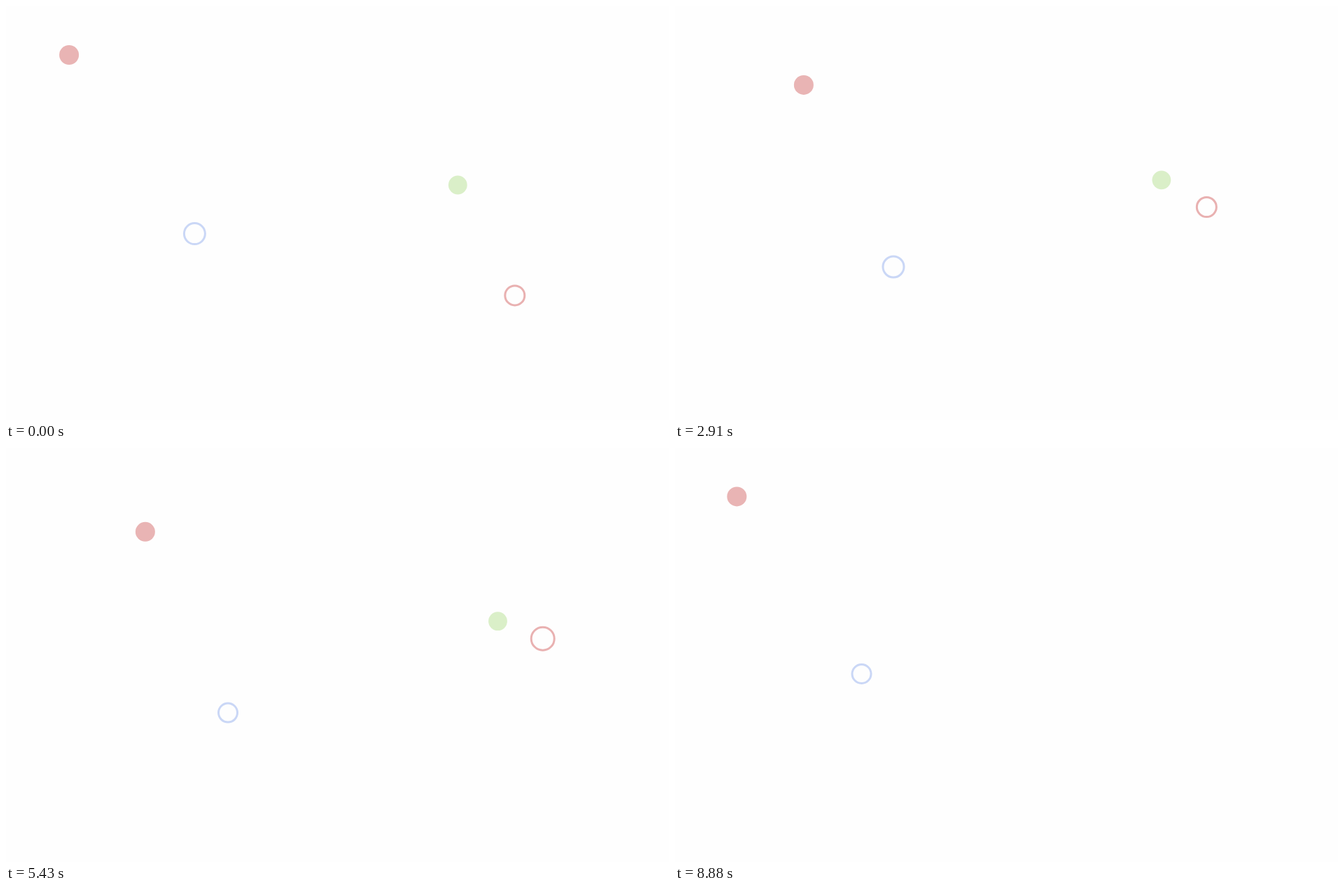
An HTML page with a canvas for the animation above (8.91 s loop, 947 by 592 pixels).

```html
<!DOCTYPE html>
<html>
<head>
<meta charset="utf-8">
<style>
html, body { margin: 0; width: 100%; height: 100%; overflow: hidden; background: #fefefe; }
canvas { display: block; }
</style>
</head>
<body>
<canvas id="stage" width="947" height="592"></canvas>
<script>
const ctx = document.getElementById('stage').getContext('2d');
const LOOP = 8910, LEG = 4400, STEP = 30;

// Each leg: start x, y, end x, y, radius.
const dots = [
  { color: '#e9b4b4', out: [90.1, 70, 231.9, 134.9, 14], back: [231.9, 134.9, 90.9, 70.6, 14] },
  { color: '#daefc8', out: [645.3, 256, 720.3, 245.2, 13.4], back: [720.1, 245.2, 644.8, 255.8, 13.4], ends: true },
  { color: '#cad7f6', ring: true, out: [269.4, 325.6, 333.8, 397.3, 15], back: [332.1, 395.2, 267.7, 324.3, 13.5] },
  { color: '#e9b1b1', ring: true, out: [726.8, 413.9, 776, 222.9, 14], back: [778.4, 227.4, 728.4, 420.6, 16.5], ends: true }
];

function drawDot(dot, t) {
  if (dot.ends && t >= 2 * LEG) return;
  const returning = t >= LEG;
  const [x0, y0, x1, y1, r] = returning ? dot.back : dot.out;
  const p = (returning ? t - LEG : t) / LEG;
  ctx.beginPath();
  ctx.arc(x0 + (x1 - x0) * p, y0 + (y1 - y0) * p, r, 0, 2 * Math.PI);
  ctx.fillStyle = ctx.strokeStyle = dot.color;
  if (dot.ring) ctx.stroke();
  else ctx.fill();
}

function draw() {
  const t = Math.floor(performance.now() % LOOP / STEP) * STEP;
  ctx.clearRect(0, 0, 947, 592);
  ctx.lineWidth = 3;
  dots.forEach(dot => drawDot(dot, t));
  requestAnimationFrame(draw);
}
draw();
</script>
</body>
</html>
```
